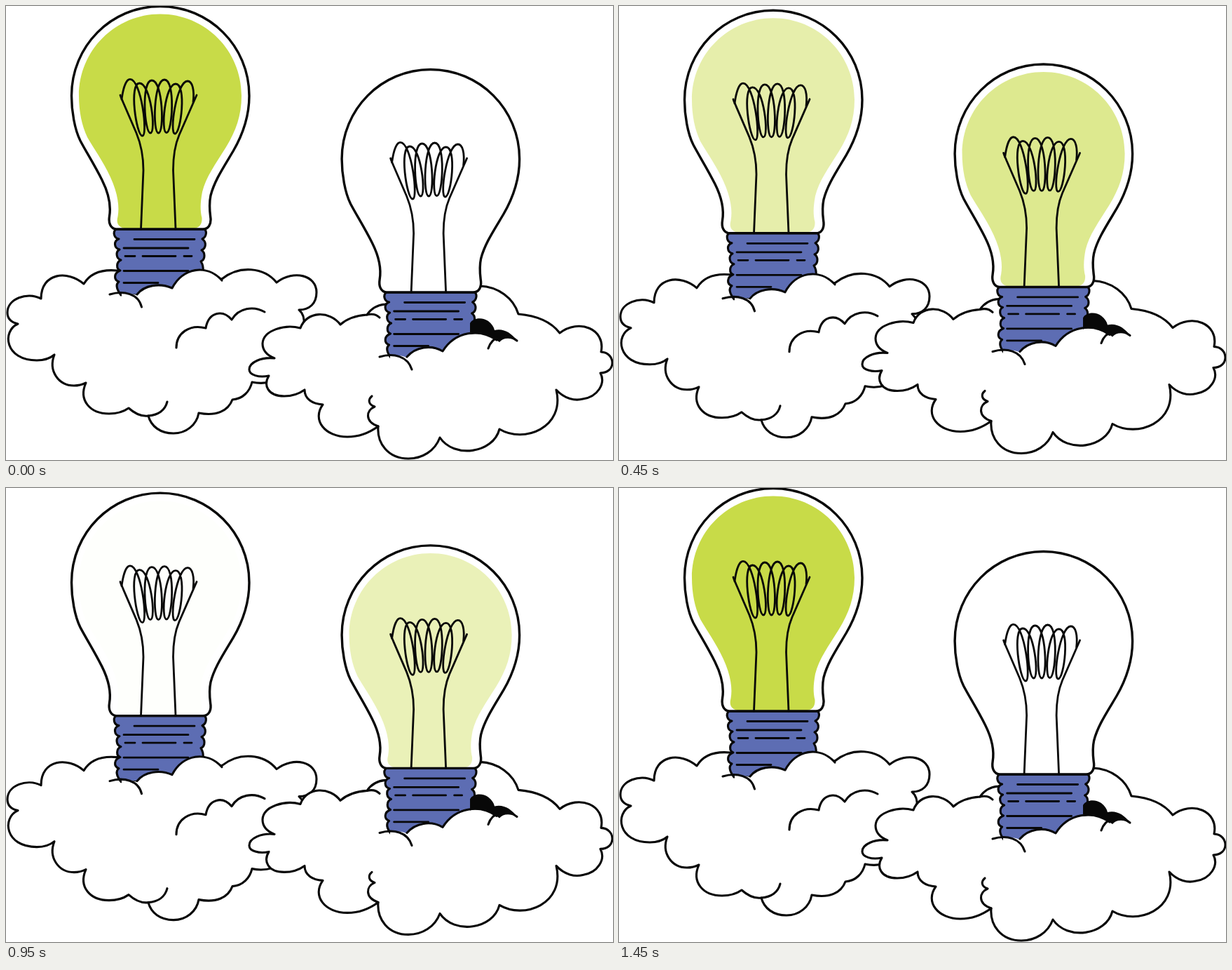
Recreate the animation shown at these times as an HTML page with a canvas. Size 866x647 px, loop 1.6 s.

```html
<!DOCTYPE html>
<html lang="en">
<head>
<meta charset="utf-8">
<title>Floating bulbs</title>
<style>
  html, body { margin: 0; width: 100%; height: 100%; overflow: hidden; background: #fff; }
  canvas { display: block; }
</style>
</head>
<body>
<canvas id="stage" width="866" height="647"></canvas>
<script>
const ctx = document.getElementById('stage').getContext('2d');
const INK = '#080808', LIME = '#c8db48', BLUE = '#5d6db3';
const LOOP = 1600, STEP = 50, LAST = 1450;
const path = d => new Path2D(d);

// Second bulb is the first one moved by this offset.
const BULB_SHIFT = [385.6, 90];

const glass = path(`M157 318 C149 317 146 309 147.5 300 C149.5 288 149 272 137 248
  C126 226 115 209 106 192 C98 176 93.5 150 93.5 128 C93.5 57 150 0.5 220 0.5
  C290 0.5 347 57 347 128 C347 158 338 183 324 207 C309 232 297 250 292 270
  C289 284 291 294 292 303 C292.5 311 289 318 281 318 Z`);

const glow = path(`M169 317 C160 315 157 309 159.5 300 C162 287 160 268 149 244
  C138 220 125 203 116 187 C108 170 104 150 104 128 C104 63 156 11.5 220 11.5
  C284 11.5 336 63 336 128 C336 156 328 178 314 201 C299 225 285 244 280 265
  C277 281 277 292 279.5 302 C280 311 276 316 268 317 Z`);

const screw = path(`M157 318 C152 322 154 331 161 332 C153 335 154 345 162 347
  C156 350 157 360 164 362 C157 365 157 375 163 377 C154 380 153 390 161 393
  C156 397 158 404 164 412 H240 L281 378 C282 371 280 367 278 364
  C285 361 284 351 279 348 C286 345 286 336 280 332 C286 329 287 321 283 318 Z`);

const threads = path(`M183 332.5 H269 M168 345 H260 M170 356.5 H184 M195 356.5 H242
  M254 356.5 H265 M168 377.5 H260 M168 394.5 H217`);

const wires = path(`M163 127 C164 131 166 134 167 137 L186 181 C193 198 196 215 196 234 L192.5 318
  M272 127 L247 184 C241 198 238.5 215 238.5 234 L242 318`);

const coil = (() => {
  const tops = [[177, 104.3], [190.5, 110], [208, 106], [226, 105], [242, 111], [259, 107]];
  const ends = [[194.5, 185], [206, 181], [217.5, 181], [229, 180.5], [241, 182]];
  const p = path('M165 133 C167 118 171 104.3 177 104.3');
  ends.forEach(([bx, by], i) => {
    const [tx, ty] = tops[i], [nx, ny] = tops[i + 1];
    p.bezierCurveTo(tx + 16, ty, bx + 8.5, by, bx, by);
    p.bezierCurveTo(bx - 8.5, by, nx - 15.5, ny, nx, ny);
  });
  p.bezierCurveTo(266, 107, 269, 120, 267, 137);
  return p;
})();

const leftCloud = {
  body: path(`M158 377 C135 375 120 381 111 396 C88 376 50 380 50 417
    C30 407 2 417 2 437 C2 446 8 451 17 453 C-6 463 -2 505 44 505 C54 505 63 502 69 497
    C60 520 75 541 97 541 C104 541 110 539 114 537 C103 562 120 581 147 581
    C158 581 168 578 175 573 C185 582 195 585 203 584 C207 599 220 609 239 609
    C257 609 272 597 275 580 C300 585 317 577 323 561 C338 560 348 549 351 536
    C360 538 370 538 380 535 L440 500 L425 455 C426 446 424 438 418 433
    C433 433 443 424 443 408 C443 384 411 375 386 394 C368 372 333 369 308 389 Z`),
  cover: path(`M165 409 C173 409 181 411 187 412 C196 399 220 394 237 403
    C252 374 285 366 308 391 V450 H165 Z`),
  lines: path(`M148 411 C168 405 189 410 193.5 429 M187 411 C197 398 219 394 237 402
    C252 373 286 367 308 391 M203 584 C217 583 227 576 230 564
    M243 487 C243 466 262 453 285 459 C289 436 309 432 322 447 C332 430 353 427 369 436`)
};

const rightCloud = {
  body: path(`M541 425 C530 426 521 431 515 440 C501 441 487 445 477 454
    C462 434 429 434 420 459 C398 453 367 462 366 481 C366 491 373 498 383 502
    C364 500 347 508 347 518 C347 526 361 530 375 527 C367 540 373 556 397 556
    C409 556 419 552 426 547 C426 560 437 567 452 568 C436 590 455 614 487 614
    C506 614 520 607 531 599 C529 623 545 645 574 645 C594 645 612 634 619 615
    C639 645 695 638 704 603 C739 624 798 601 785 547 C797 560 812 563 823 560
    C844 557 856 538 848 523 C871 523 870 494 849 493 C856 460 817 445 790 466
    C777 449 754 441 731 439 C724 416 702 400 676 399 Z`),
  shade: path(`M662 466 V452 C666 444 680 443 688 449 C693 453 696 457 697 462
    C710 459 721 466 729 477 C718 472 709 473 704 479 C690 468 676 465 662 468 Z`),
  cover: path(`M548 499 C556 497 565 498 572 501 C584 487 606 483 623 493
    C641 464 678 459 700 476 V520 H548 Z`),
  lines: path(`M533 500 C553 494 573 499 579 518 M572 500 C584 486 606 482 623 492
    C641 463 676 459 700 476 M688 488 C694 470 713 465 729 477
    M515 440 C523 438 529 440 533 444
    M522 556 C516 561 517 568 526 571 C514 576 511 592 531 599`)
};

function fill(shape, color) {
  ctx.fillStyle = color;
  ctx.fill(shape);
}

function outline(shape, width = 3.1) {
  ctx.lineWidth = width;
  ctx.stroke(shape);
}

function drawBulb(light) {
  fill(screw, BLUE);
  outline(screw);
  outline(threads, 2.8);
  fill(glass, '#fff');
  ctx.globalAlpha = light;
  fill(glow, LIME);
  ctx.globalAlpha = 1;
  outline(glass, 3.4);
  outline(wires, 2.8);
  outline(coil, 2.8);
}

function drawGroup(cloud, [bulbX, bulbY], dy, light) {
  ctx.save();
  ctx.translate(0, dy);
  fill(cloud.body, '#fff');
  outline(cloud.body);
  ctx.save();
  ctx.translate(bulbX, bulbY);
  drawBulb(light);
  ctx.restore();
  fill(cloud.cover, '#fff');
  if (cloud.shade) fill(cloud.shade, INK);
  outline(cloud.lines);
  ctx.restore();
}

const ramp = (t, from, to) => Math.min(1, Math.max(0, (t - from) / (to - from)));

function render(now) {
  const t = Math.min(LAST, Math.floor((now % LOOP) / STEP) * STEP);
  const sway = (1 - Math.cos(2 * Math.PI * t / LAST)) / 2;
  const leftLight = 1 - ramp(t, 250, 620) + ramp(t, 945, 1240);
  const rightLight = ramp(t, 135, 650) - ramp(t, 715, 1100);

  ctx.fillStyle = '#fff';
  ctx.fillRect(0, 0, 866, 647);
  ctx.strokeStyle = INK;
  ctx.lineCap = ctx.lineJoin = 'round';
  drawGroup(leftCloud, [0, 0], 8.5 * sway, leftLight);
  drawGroup(rightCloud, BULB_SHIFT, -11 * sway, rightLight);
}

let start;
function tick(now) {
  start ??= now;
  render(now - start);
  requestAnimationFrame(tick);
}
render(0);
requestAnimationFrame(tick);
</script>
</body>
</html>
```
